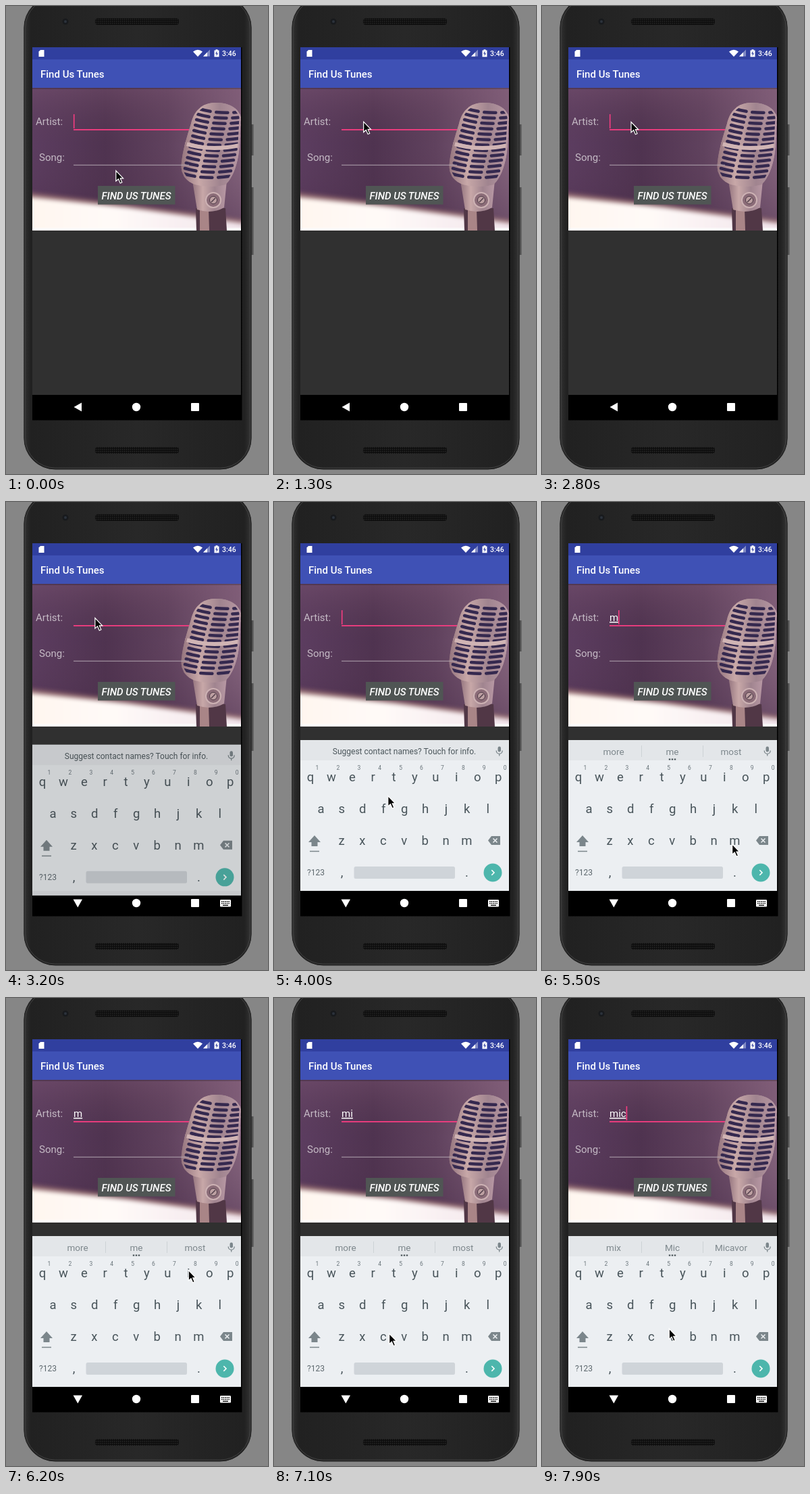
An HTML page for the animation above (8000 ms loop, 388x692 px).

```html
<!DOCTYPE html>
<html lang="en">
<head>
<meta charset="utf-8">
<title>Lyrics search on a phone</title>
<style>
  html, body { margin: 0; width: 100%; height: 100%; overflow: hidden; background: #868686; }
  svg { display: block; width: 388px; height: 692px; font: 15px Roboto, sans-serif; }
  .medium { font-weight: 500; fill: #fff; }
  .label { fill: #c5bac5; }
  .mid { text-anchor: middle; }
  .key { font-size: 18.5px; fill: #48545a; }
  .hint { font-size: 8.5px; fill: #69747a; }
  .word { font-size: 13.5px; fill: #7d878c; }
</style>
</head>
<body>
<svg viewBox="0 0 388 692">
  <defs>
    <linearGradient id="body">
      <stop offset="0" stop-color="#303030"/><stop offset=".03" stop-color="#212121"/>
      <stop offset=".5" stop-color="#282828"/><stop offset=".97" stop-color="#212121"/>
      <stop offset="1" stop-color="#343434"/>
    </linearGradient>
    <linearGradient id="wall">
      <stop offset="0" stop-color="#5c3d60"/><stop offset=".35" stop-color="#4f3350"/>
      <stop offset=".65" stop-color="#60425e"/><stop offset="1" stop-color="#86657f"/>
    </linearGradient>
    <linearGradient id="shade" x2="0" y2="1">
      <stop offset="0" stop-color="#7a5470" stop-opacity=".45"/><stop offset=".4" stop-color="#5a3c52" stop-opacity="0"/>
      <stop offset="1" stop-color="#3e2440" stop-opacity=".4"/>
    </linearGradient>
    <linearGradient id="floor">
      <stop offset="0" stop-color="#fff6ee"/><stop offset=".4" stop-color="#fffaf8"/><stop offset="1" stop-color="#f0e2ea"/>
    </linearGradient>
    <linearGradient id="steel">
      <stop offset="0" stop-color="#94747e"/><stop offset=".3" stop-color="#c8a8a8"/>
      <stop offset=".65" stop-color="#a0848f"/><stop offset="1" stop-color="#b898a4"/>
    </linearGradient>
    <filter id="soft"><feGaussianBlur stdDeviation="3"/></filter>
    <pattern id="mesh" width="3" height="3" patternUnits="userSpaceOnUse">
      <rect width="3" height="3" fill="#0e0e0e"/><circle cx="1.5" cy="1.5" r=".8" fill="#2c2c2c"/>
    </pattern>
    <clipPath id="photo"><rect x="39" y="121" width="309" height="211"/></clipPath>
    <path id="head" d="M309 143C326 142 344 149 348 164L346 205C344 232 337 253 325 264Q303 270 280 264C264 258 258 246 260 231C262 212 268 193 274 174C279 154 290 144 309 143z"/>
    <clipPath id="inside"><use href="#head"/></clipPath>
  </defs>

  <rect width="388" height="692" fill="#868686"/>
  <path d="M363 175h3.500v46h-3.500zM363 268h3.500v100h-3.500z" fill="#525252"/>
  <rect x="26.800" y="-14" width="336.400" height="699" rx="46" fill="url(#body)" stroke="#242424"/>
  <rect x="28.800" y="-12" width="332.400" height="695" rx="44" fill="none" stroke="#414141"/>
  <circle cx="88" cy="23" r="4.500" fill="#181a1d"/><circle cx="88" cy="23" r="2" fill="#2c323c"/>
  <rect x="132" y="18" width="124" height="10" rx="4" fill="url(#mesh)"/>
  <rect x="132" y="652" width="124" height="10" rx="4" fill="url(#mesh)"/>

  <rect x="39" y="61" width="310.500" height="551.500"/>
  <rect x="39" y="121" width="309" height="454" fill="#303030"/>
  <rect x="39" y="61" width="309" height="18" fill="#303f9f"/>
  <rect x="39" y="79" width="309" height="42" fill="#3f51b5"/>
  <g fill="#fff">
    <path d="M51 65h5.500v10h-8v-7.500z"/>
    <path d="M277 67.500Q284 62 291 67.500L284 75z"/>
    <path d="M302 64.500V74.500H292z" opacity=".4"/><path d="M298 68.500V74.500H292z"/>
    <path d="M308.500 65.500h2v-1.200h3v1.200h2v9.700h-7z"/>
    <path d="M312.500 66.500l-2.500 4h1.700v3.500l2.300-4.300h-1.700z" fill="#303f9f"/>
  </g>
  <text class="medium" x="320" y="74" style="font-size:10.500px">3:46</text>
  <text class="medium" x="51" y="105.500">Find Us Tunes</text>

  <g clip-path="url(#photo)">
    <rect x="39" y="121" width="309" height="211" fill="url(#wall)"/>
    <rect x="39" y="121" width="309" height="211" fill="url(#shade)"/>
    <path d="M20 274L180 293L370 319V350H20z" fill="#b08278" opacity=".6" filter="url(#soft)"/>
    <path d="M20 281L180 298L370 324V350H20z" fill="url(#floor)" filter="url(#soft)"/>
    <rect x="39" y="328" width="309" height="4" fill="#fff" opacity=".8"/>
    <path d="M281 299H325L327 332H282z" fill="#513746"/>
    <path d="M287 300h13l1 32h-14z" fill="#a98587"/>
    <path d="M276 258H327L323 298Q305 308 283 301z" fill="url(#steel)"/>
    <circle cx="307" cy="287" r="11" fill="#8b6c78" stroke="#cdb2b4" stroke-width="2"/>
    <circle cx="307" cy="287" r="5.500" fill="#bda0a2" stroke="#4d3a46"/><path d="M304 290l6-6" stroke="#4d3a46" stroke-width="1.500"/>
    <use href="#head" fill="url(#steel)"/>
    <g clip-path="url(#inside)">
      <g id="slots" fill="none" stroke="#35294f" stroke-width="4.600" stroke-linecap="round" stroke-dasharray="17 9"/>
      <path d="M264 203Q303 216 350 205" fill="none" stroke="#d0b4b4" stroke-width="6"/>
      <use href="#head" fill="none" stroke="url(#steel)" stroke-width="5"/>
    </g>
  </g>
  <rect x="39" y="121" width="309" height="2" fill="#000" opacity=".2"/>

  <text class="label" x="44" y="176">Artist:</text>
  <text class="label" x="49" y="229">Song:</text>
  <rect x="100" y="182" width="171" height="1.800" fill="#f53c80"/>
  <rect x="100" y="234.700" width="171" height="1" fill="#b3a6b1"/>
  <text id="typed" x="100" y="176" fill="#fff" text-decoration="underline"></text>
  <rect id="caret" y="160" width="1.600" height="21" fill="#f53c80"/>
  <rect x="136" y="266" width="114.500" height="27.500" fill="#505554"/>
  <text class="medium mid" x="193" y="285.500" font-style="italic">FIND US TUNES</text>

  <g fill="#fff">
    <path id="back"/>
    <circle cx="193" cy="593" r="6.200"/>
    <rect x="274" y="587" width="12" height="12" rx="1"/>
    <g id="switcher">
      <rect x="317" y="588" width="16" height="10.500" rx="1.200"/>
      <path d="M319 590.800h12M319 593.500h12" stroke="#000" stroke-width="1.400" stroke-dasharray="1.500 1.100"/>
      <path d="M321 596.300h8" stroke="#000" stroke-width="1.300"/>
    </g>
  </g>

  <g id="keyboard">
    <rect x="39" y="352" width="309" height="223" fill="#eceff2"/>
    <rect x="39" y="352" width="309" height="30" fill="#e3e6e9"/>
    <text id="notice" class="mid" x="193" y="373" fill="#4b565b" style="font-size:12px">Suggest contact names? Touch for info.</text>
    <g id="words">
      <text class="word mid" x="106" y="374"></text>
      <text class="word mid" x="193" y="374"></text>
      <text class="word mid" x="280" y="374"></text>
      <path d="M147.500 360v17M238.500 360v17" stroke="#cdd2d5"/>
      <path d="M187.800 380.500h2.400m1.600 0h2.400m1.600 0h2.400" stroke="#414b50" stroke-width="2.200"/>
    </g>
    <g fill="#7b868b" stroke="#7b868b">
      <rect x="331.500" y="361.500" width="4.500" height="8" rx="2.200" stroke="none"/>
      <path d="M329.200 367.500c0 6.500 9 6.500 9 0M333.700 372.500v3" fill="none" stroke-width="1.300"/>
      <path d="M60 493L69 503H64.500V509H55.500V503H51z" stroke="none"/>
      <path d="M53 516.500h14" stroke-width="1.500"/>
      <path d="M317 500.500L322 494H335V507H322z" stroke="none"/>
      <path d="M324.500 497.500l6 6m0-6l-6 6" stroke="#eceff2" stroke-width="1.500"/>
    </g>
    <text class="mid" x="62" y="552" fill="#5c676d" style="font-size:12px">?123</text>
    <rect x="118.500" y="539" width="149.500" height="18" rx="2.500" fill="#cfd4d9"/>
    <circle cx="324" cy="548" r="13.500" fill="#4db6ac"/>
    <path d="M322.300 544.300l3.700 3.700l-3.700 3.700" fill="none" stroke="#fff" stroke-width="1.600"/>
  </g>

  <path id="mouse" d="M.8 1.600V17L4.500 13.700L7.200 19.900L9.800 18.800L7.200 12.800H11.600z" stroke="#fff" stroke-width="1.200"/>
</svg>
<script>
const LOOP = 8000, BLINK = 500, SHOW_AT = 3080, SHOW_TIME = 200;
const el = id => document.getElementById(id);

function add(parent, tag, attrs, text = '') {
  const node = document.createElementNS('http://www.w3.org/2000/svg', tag);
  for (const name in attrs) node.setAttribute(name, attrs[name]);
  node.textContent = text;
  parent.append(node);
}

// Microphone grille: bowed rows of slots, shifting left as the head leans
for (let y = 152; y < 256; y += 8) {
  const left = 286 - (y - 152) * .24;
  add(el('slots'), 'path', { d: `M${left} ${y}Q${left + 36} ${y + 11} ${left + 84} ${y + 1}` });
}

const keyText = (x, y, text, kind = 'key') => add(el('keyboard'), 'text', { x, y, class: kind + ' mid' }, text);
[['qwertyuiop', 54, 413], ['asdfghjkl', 69.5, 460], ['zxcvbnm', 100, 507]].forEach(([row, x, y]) =>
  [...row].forEach((letter, i) => keyText(x + 30.9 * i, y, letter)));
[...'1234567890'].forEach((digit, i) => keyText(64 + 30.9 * i, 396, digit, 'hint'));
keyText(100.5, 554, ',');
keyText(285.5, 554, '.');

// Each row: time, x, y of the pointer tip
const path = [
  [100, 162, 242], [600, 132, 169.5], [3600, 131, 170], [4000, 168, 433], [4350, 205, 458],
  [5000, 278.5, 507.5], [5600, 281, 504], [6200, 269.5, 401], [6600, 269.5, 401],
  [7200, 162, 502], [7600, 162, 502], [7900, 187.5, 487.5]
];
const typing = [[0, ''], [5500, 'm'], [6600, 'mi'], [7500, 'mic']];
const caretX = { '': 99.9, m: 113, mi: 116.8, mic: 124.6 };
const guesses = [[5500, ['more', 'me', 'most']], [7500, ['mix', 'Mic', 'Micavor']]];
const blinkStarts = [[-200], [2700], [5500], [6600], [7500]];

const latest = (list, t) => list.findLast(item => item[0] <= t);
const clamp = v => Math.min(1, Math.max(0, v));

function pointer(t) {
  const next = path.findIndex(p => p[0] > t);
  if (next === 0) return path[0].slice(1);
  if (next < 0) return path.at(-1).slice(1);
  const [a, b] = [path[next - 1], path[next]];
  const u = (t - a[0]) / (b[0] - a[0]), e = u * u * (3 - 2 * u);
  return [1, 2].map(k => a[k] + (b[k] - a[k]) * e);
}

function draw(t) {
  el('mouse').setAttribute('transform', `translate(${pointer(t)})`);

  const text = latest(typing, t)[1];
  el('typed').textContent = text;
  el('caret').setAttribute('x', caretX[text]);
  const off = Math.floor((t - latest(blinkStarts, t)[0]) / BLINK) % 2;
  el('caret').setAttribute('opacity', 1 - off);

  const shown = 1 - (1 - clamp((t - SHOW_AT) / SHOW_TIME)) ** 2;
  el('keyboard').setAttribute('opacity', shown);
  el('keyboard').setAttribute('transform', `translate(0 ${44 * (1 - shown)})`);
  el('switcher').setAttribute('opacity', +(shown > 0));
  el('back').setAttribute('d', shown ? 'M99.500 587.500H113L106.300 599.500z' : 'M100.500 593L112 586.500V599.500z');

  const guess = latest(guesses, t);
  el('notice').setAttribute('opacity', guess ? 0 : 1);
  el('words').setAttribute('opacity', guess ? 1 : 0);
  if (guess) el('words').querySelectorAll('text').forEach((node, i) => node.textContent = guess[1][i]);
}

function frame() {
  draw(performance.now() % LOOP);
  requestAnimationFrame(frame);
}
frame();
</script>
</body>
</html>
```
